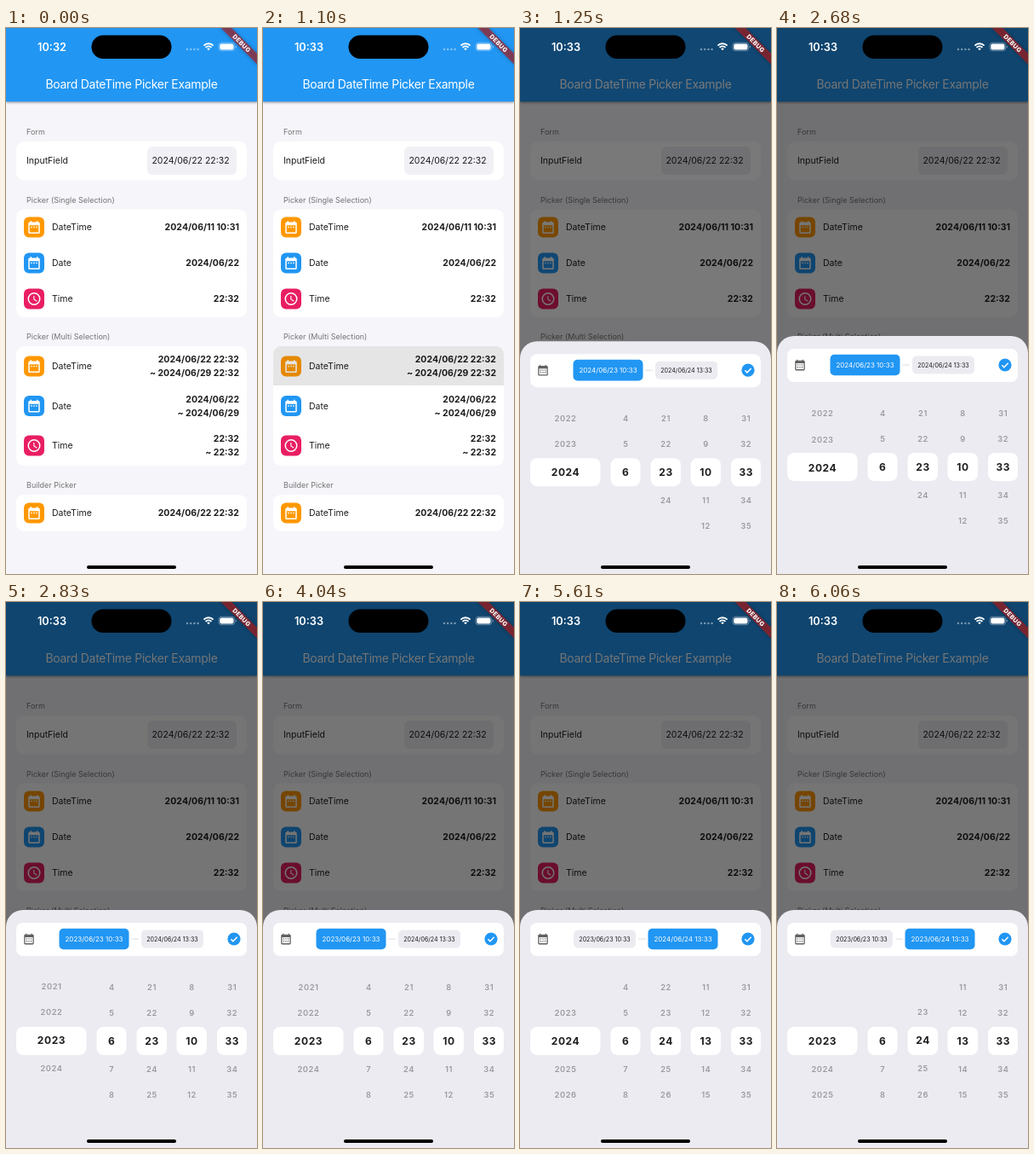
These frames come from a looping animation (295x640 px, 8 s). An HTML page:

```html
<!DOCTYPE html>
<html lang="en">
<head>
<meta charset="utf-8">
<title>Date picker demo</title>
<style>
  html, body { margin: 0; width: 100%; height: 100%; overflow: hidden; }
  svg { display: block; width: 295px; height: 640px; font-family: Inter, "Open Sans", sans-serif; }
  text { fill: #1d1d1f; font-size: 10.5px; }
  .head { fill: #757575; font-size: 9px; }
  .bold { font-weight: 700; text-anchor: end; font-kerning: none; }
  .mid { text-anchor: middle; }
  .title { fill: #fff; font-size: 14px; letter-spacing: -.3px; }
  .time { fill: #fff; font-size: 12.75px; font-weight: 600; }
  .debug { fill: #fff; font-size: 7.2px; font-weight: 800; letter-spacing: .3px; }
  .bar { filter: drop-shadow(0 1.8px 1.7px rgba(0, 0, 0, .4)); }
  .wheel { text-anchor: middle; font-size: 9.3px; font-weight: 600; letter-spacing: .6px; fill: #9b9b9f; }
  .wheel.on { font-size: 12px; font-weight: 700; fill: #1d1d1f; }
  .chip rect { fill: #ebebf1; }
  .chip text { font-size: 7.1px; text-anchor: middle; }
  .chip.on rect { fill: #2196f3; }
  .chip.on text { font-size: 8px; fill: #fff; }
</style>
</head>
<body>
<svg viewBox="0 0 295 640">
  <defs>
    <path id="cal" fill-rule="evenodd" d="M19 4h-1V3a1 1 0 0 0-2 0v1H8V3a1 1 0 0 0-2 0v1H5a2 2 0 0 0-2 2v14a2 2 0 0 0 2 2h14a2 2 0 0 0 2-2V6a2 2 0 0 0-2-2zM19 20H5V9h14zM7 11h2v2H7zM11 11h2v2h-2zM15 11h2v2h-2z"/>
    <g id="clock" fill="none" stroke="#fff" stroke-width="2" stroke-linecap="round">
      <circle cx="12" cy="12" r="9"/><path d="M11.8 7.7v5l4.1 2.5" stroke-width="1.5"/>
    </g>
    <clipPath id="window"><rect y="72" width="295" height="162"/></clipPath>
  </defs>

  <rect width="295" height="640" fill="#f5f5fa"/>
  <rect class="bar" width="295" height="86.3" fill="#2196f3"/>
  <text class="title mid" x="147.5" y="65.5" dy=".36em">Board DateTime Picker Example</text>
  <g id="page"></g>
  <path id="press" d="M12 419V382a9 9 0 0 1 9-9H274a9 9 0 0 1 9 9V419z" opacity="0"/>
  <rect id="shade" width="295" height="640" opacity="0"/>

  <g id="sheet">
    <path d="M0 300V20A20 20 0 0 1 20 0H275A20 20 0 0 1 295 20V300z" fill="#ebebf1"/>
    <rect x="12" y="15" width="271" height="39" rx="8" fill="#fff"/>
    <g transform="translate(19.3 26.3) scale(.64)" fill="#616161">
      <use href="#cal"/><path d="M7 15h2v2H7zM11 15h2v2h-2zM15 15h2v2h-2z"/>
    </g>
    <g class="chip"><rect rx="5"/><text y="34" dy=".36em"></text></g>
    <path id="dash" d="M0 34h8.5" stroke="#dcdce2"/>
    <g class="chip"><rect rx="5"/><text y="34" dy=".36em"></text></g>
    <circle cx="268" cy="34" r="7.6" fill="#2196f3"/>
    <path d="M264.4 34.2l2.5 2.5 4.8-4.9" fill="none" stroke="#fff" stroke-width="1.5"/>
    <g id="boxes" fill="#fff"></g>
    <g id="wheels" clip-path="url(#window)"></g>
  </g>

  <rect x="100.5" y="8.5" width="94" height="27.5" rx="13.75"/>
  <text id="time" class="time mid" x="54" y="22" dy=".36em"></text>
  <g fill="#fff" fill-opacity=".45">
    <circle cx="213" cy="25" r="1.2"/><circle cx="217.2" cy="25" r="1.2"/>
    <circle cx="221.4" cy="25" r="1.2"/><circle cx="225.6" cy="25" r="1.2"/>
  </g>
  <g fill="none" stroke="#fff" stroke-width="1.9">
    <path d="M232.4 20.6a8 8 0 0 1 11.2 0M234.5 22.9a5 5 0 0 1 7 0"/>
    <path d="M236.2 24.3a2.7 2.7 0 0 1 3.6 0L238 26.2z" fill="#fff" stroke="none"/>
  </g>
  <rect x="250" y="17.3" width="18.8" height="9.4" rx="3" fill="none" stroke="#fff" stroke-opacity=".45" stroke-width=".8"/>
  <rect x="251.3" y="18.6" width="16.2" height="6.8" rx="1.9" fill="#fff"/>
  <path d="M269.9 20.5a1.6 1.6 0 0 1 0 3z" fill="#fff" fill-opacity=".5"/>
  <rect x="95" y="630" width="105" height="4" rx="2"/>
  <g transform="translate(295 0) rotate(45)">
    <rect x="-32" y="21" width="64" height="9" fill="#b71c1c" fill-opacity=".63" style="filter:drop-shadow(0 0 2px rgba(0,0,0,.45))"/>
    <text class="debug mid" y="25.5" dy=".36em">DEBUG</text>
  </g>
</svg>
<script>
const $ = s => document.querySelector(s);
const LOOP = 8000;

// ---- page ----
const card = (y, h) => `<rect x="12" y="${y}" width="271" height="${h}" rx="9" fill="#fff"/>`;
const label = (cls, x, y, s) => `<text class="${cls}" x="${x}" y="${y}" dy=".36em">${s}</text>`;
const kinds = {
  DateTime: ['#ff9800', 'cal'],
  Date: ['#2196f3', 'cal'],
  Time: ['#e91e63', 'clock']
};
function row(y, kind, ...lines) {
  const [color, icon] = kinds[kind];
  const values = lines.map((s, i) => label('bold', 274, y + (i - (lines.length - 1) / 2) * 15.8, s));
  return `<rect x="21" y="${y - 12}" width="24" height="24" rx="6" fill="${color}"/>
    <use href="#${icon}" fill="#fff" transform="translate(24 ${y - 9}) scale(.75)"/>` +
    label('', 54, y, kind) + values.join('');
}
$('#page').innerHTML = [
  label('head', 24, 121.5, 'Form'), card(133, 45.5),
  label('', 24, 155.5, 'InputField'),
  '<rect x="166" y="139" width="105" height="33" rx="6" fill="#f0f0f5"/>',
  label('mid', 217, 155.5, '2024/06/22 22:32'),
  label('head', 24, 201.5, 'Picker (Single Selection)'), card(212.5, 126.5),
  row(233.5, 'DateTime', '2024/06/11 10:31'),
  row(275.5, 'Date', '2024/06/22'),
  row(317.5, 'Time', '22:32'),
  label('head', 24, 362, 'Picker (Multi Selection)'), card(373, 140),
  row(396.5, 'DateTime', '2024/06/22 22:32', '~ 2024/06/29 22:32'),
  row(443, 'Date', '2024/06/22', '~ 2024/06/29'),
  row(489.5, 'Time', '22:32', '~ 22:32'),
  label('head', 24, 536, 'Builder Picker'), card(547, 43),
  row(568.5, 'DateTime', '2024/06/22 22:32')
].join('');

// ---- wheels ----
const columns = [[12, 82.5], [106.5, 35], [153.5, 35.5], [200.5, 35.5], [248, 35]];
const MID = 153.5, REACH = 3;
$('#boxes').innerHTML = columns.map(([x, w]) =>
  `<rect x="${x}" y="137" width="${w}" height="33" rx="8"/>`).join('');
const wheels = columns.map(([x, w]) => {
  const slots = [];
  for (let k = -REACH; k <= REACH; k++) {
    const el = document.createElementNS('http://www.w3.org/2000/svg', 'text');
    el.setAttribute('class', k ? 'wheel' : 'wheel on');
    el.setAttribute('x', x + w / 2 + .3);
    el.setAttribute('dy', '.36em');
    $('#wheels').append(el);
    slots.push(el);
  }
  return slots;
});
function turn(slots, pos, min, max) {
  const near = Math.round(pos);
  slots.forEach((el, i) => {
    const value = near + i - REACH;
    el.textContent = value < min || value > max ? '' : value;
    el.setAttribute('y', MID + 116.6 * Math.sin(.287 * (value - pos)));
  });
}

// ---- chips ----
const chips = document.querySelectorAll('.chip');
function setChip(el, mid, on, text) {
  const w = on ? 82 : 73, h = on ? 24.6 : 21;
  const box = el.firstChild, words = el.lastChild;
  el.setAttribute('class', on ? 'chip on' : 'chip');
  box.setAttribute('x', mid - w / 2);
  box.setAttribute('y', 34 - h / 2);
  box.setAttribute('width', w);
  box.setAttribute('height', h);
  words.setAttribute('x', mid);
  words.textContent = text;
}

// ---- motion ----
const clamp = v => Math.max(0, Math.min(1, v));
const ramp = (t, a, b) => clamp((t - a) / (b - a));
const easeOut = p => 1 - (1 - p) ** 3;
const smooth = p => p * p * (3 - 2 * p);

function bezier(x1, y1, x2, y2) {
  const at = (a, b, s) => 3 * a * s * (1 - s) ** 2 + 3 * b * s * s * (1 - s) + s ** 3;
  return x => {
    let lo = 0, hi = 1;
    for (let i = 0; i < 24; i++) {
      const s = (lo + hi) / 2;
      if (at(x1, x2, s) < x) lo = s; else hi = s;
    }
    return at(y1, y2, hi);
  };
}
const decelerate = bezier(0, 0, .2, 1);
const ease = bezier(.25, .1, .25, 1);

const ticks = [0, 630, 910, 1040, 1110, 1180, 1250, 2680, 2760, 2830, 4040, 4120, 4190, 4260, 4340,
  5610, 5680, 5760, 5830, 5910, 5980, 6060];

function render(t) {
  $('#time').textContent = t < 630 ? '10:32' : '10:33';

  const open = t >= 2680 ? 1 : ramp(t, 1084, 1291);
  $('#sheet').setAttribute('transform', `translate(0 ${640 - 279 * decelerate(open)})`);
  $('#sheet').setAttribute('visibility', open ? 'visible' : 'hidden');
  $('#shade').setAttribute('opacity', .54 * ease(open));
  $('#press').setAttribute('opacity', t < 2680 ? .1 * ramp(t, 840, 1040) : 0);

  const second = t >= 4120;
  const swap = smooth(ramp(t, 4080, 4350));
  const drag1 = t >= 4040 ? 1 : smooth(ramp(t, 2662, 2846));
  const drag2 = t >= 6060 ? 1 : smooth(ramp(t, 5610, 5860));
  const year = 2024 - drag1 + swap - drag2;
  const early = t >= 2830;
  const late = t >= 5830;
  const settle = late ? .02 + .3 * (1 - easeOut(ramp(t, 5830, 6060))) : 0;

  turn(wheels[0], year, second ? 2023 : 1970, second ? 2050 : 2024);
  turn(wheels[1], 6, late ? 6 : 1, early ? 12 : 6);
  turn(wheels[2], 23 + swap + settle, late ? 23 : 1, early ? 30 : 24);
  turn(wheels[3], 10 + 3 * swap, 0, 23);
  turn(wheels[4], 33, 0, 59);

  setChip(chips[0], second ? 99.5 : 103.5, !second, `${early ? 2023 : 2024}/06/23 10:33`);
  setChip(chips[1], second ? 191.5 : 195.5, second, `${late ? 2023 : 2024}/06/24 13:33`);
  $('#dash').setAttribute('transform', `translate(${second ? 139.3 : 147.3} 0)`);
}

const start = performance.now();
let shown = -1;
function frame() {
  const now = (performance.now() - start) % LOOP;
  const tick = ticks.filter(k => k <= now).pop();
  if (tick !== shown) render(shown = tick);
  requestAnimationFrame(frame);
}
frame();
</script>
</body>
</html>
```
